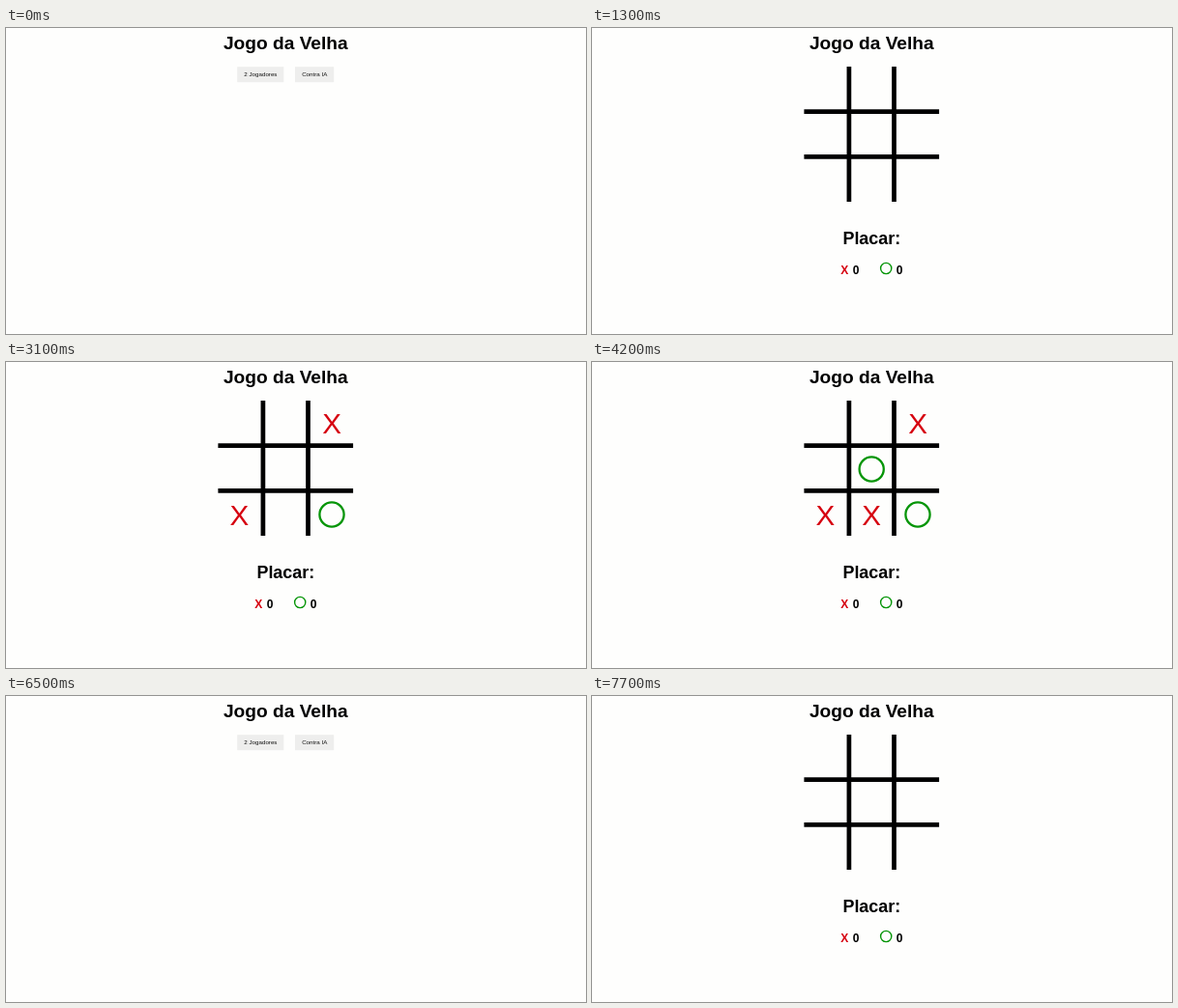
An HTML page that plays this animation: 600 px wide and 317 px high, repeating every 8 s.

```html
<!DOCTYPE html>
<html lang="pt">
<head>
<meta charset="utf-8">
<title>Jogo da Velha</title>
<style>
html, body { margin: 0; width: 100%; height: 100%; overflow: hidden; background: #fefefd; }
svg { display: block; width: 600px; height: 317px; }
text { font-family: "Liberation Sans", Arial, sans-serif; text-anchor: middle; }
.bold { font-weight: bold; }
.button rect { fill: #eeeeed; }
.button text { font-size: 6.2px; fill: #111; }
.grid { stroke: #000; stroke-width: 4.7; }
.x { fill: #d6000f; }
.o { fill: none; stroke: #069508; }
#marks .x { font-size: 29.6px; }
#marks .o { stroke-width: 2.3; }
</style>
</head>
<body>
<svg viewBox="0 0 600 317">
  <text class="bold" x="289.3" y="22.4" font-size="19.15">Jogo da Velha</text>
  <g id="menu">
    <g class="button"><rect x="239.2" y="40.2" width="48.1" height="16"/><text x="263.4" y="50.4">2 Jogadores</text></g>
    <g class="button"><rect x="299" y="40.2" width="40.2" height="16"/><text x="319.2" y="50.4">Contra IA</text></g>
  </g>
  <g id="game">
    <path class="grid" d="M265.9 40V180M312.5 40V180M219.4 86.7H359.1M219.4 133.3H359.1"/>
    <g id="marks"></g>
    <g class="bold">
      <text x="289.3" y="224.2" font-size="17.9">Placar:</text>
      <g font-size="12">
        <text class="x" x="261.2" y="255">X</text>
        <text x="273" y="255">0</text>
        <circle class="o" cx="304.2" cy="249" r="5.6" stroke-width="1.4"/>
        <text id="score" x="318.1" y="255">0</text>
      </g>
    </g>
  </g>
  <g id="message">
    <rect x="163.9" y="86.1" width="250.9" height="45"/>
    <text x="289.3" y="117" font-size="23.35" fill="#f4f4f4">O jogador 2 venceu!</text>
  </g>
</svg>
<script>
const LOOP = 8000, START = 1300, WIN = 4700, MENU = 6500, RESTART = 7700;
const CELL = 47.8;
const moves = [
  { at: 1800, mark: "x", col: 0, row: 2 },
  { at: 2500, mark: "o", col: 2, row: 2 },
  { at: 3100, mark: "x", col: 2, row: 0 },
  { at: 3600, mark: "o", col: 1, row: 1 },
  { at: 4200, mark: "x", col: 1, row: 2 }
];
const $ = id => document.getElementById(id);
const show = (el, on) => { el.style.display = on ? "" : "none"; };

function addMark({ mark, col, row }) {
  const isX = mark === "x";
  const el = document.createElementNS("http://www.w3.org/2000/svg", isX ? "text" : "circle");
  const x = 289.2 + (col - 1) * CELL;
  const y = (isX ? 121.5 : 111) + (row - 1) * (isX ? CELL : 47);
  const attrs = isX ? { x, y } : { cx: x, cy: y, r: 12.6 };
  for (const key in attrs) el.setAttribute(key, attrs[key]);
  el.setAttribute("class", mark);
  if (isX) el.textContent = "X";
  $("marks").append(el);
  return el;
}

for (const move of moves) move.el = addMark(move);

function draw(t) {
  const playing = (t >= START && t < MENU) || t >= RESTART;
  const won = t >= WIN && t < MENU;
  show($("menu"), !playing);
  show($("game"), playing);
  show($("message"), won);
  $("score").textContent = won ? "1" : "0";
  for (const { at, el } of moves) show(el, t >= at && t < WIN);
}

const begin = performance.now();
function tick() {
  draw((performance.now() - begin) % LOOP);
  requestAnimationFrame(tick);
}
tick();
</script>
</body>
</html>
```
